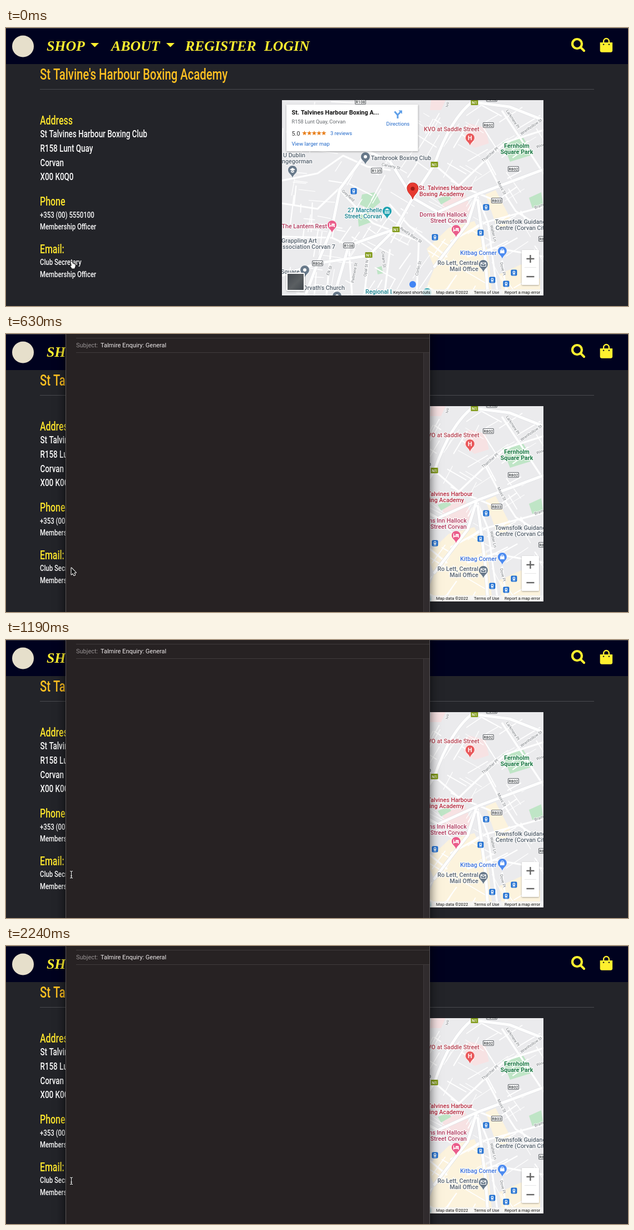
An HTML page with a canvas for the animation above (2.38 s loop, 1118 by 501 pixels).

```html
<!DOCTYPE html>
<html lang="en">
<head>
<meta charset="utf-8">
<title>Contact page</title>
<style>
html, body { margin: 0; width: 100%; height: 100%; overflow: hidden; background: #232429; }
canvas { display: block; }
</style>
</head>
<body>
<canvas id="stage" width="1118" height="501"></canvas>
<script>
const W = 1118, H = 501, LOOP = 2380;
const SANS = 'Roboto, "Liberation Sans", sans-serif';
const SERIF = '"Liberation Serif", "Times New Roman", serif';
const CONDENSED = 0.74;
const view = document.getElementById('stage').getContext('2d');
const page = document.createElement('canvas');
page.width = W;
page.height = H;
let g = page.getContext('2d');

function box(x, y, w, h, color) {
  g.fillStyle = color;
  g.fillRect(x, y, w, h);
}

function round(x, y, w, h, r, color) {
  g.fillStyle = color;
  g.beginPath();
  g.roundRect(x, y, w, h, r);
  g.fill();
}

function disc(x, y, r, color) {
  g.fillStyle = color;
  g.beginPath();
  g.arc(x, y, r, 0, 7);
  g.fill();
}

function shape(d, fill, stroke, width = 1) {
  const p = new Path2D(d);
  if (stroke) {
    g.strokeStyle = stroke;
    g.lineWidth = width;
    g.stroke(p);
  }
  if (fill) {
    g.fillStyle = fill;
    g.fill(p);
  }
}

function text(s, x, y, size, color, { weight = 400, align = 'left', halo = 0, font = SANS } = {}) {
  g.font = `${weight} ${size}px ${font}`;
  g.textAlign = align;
  if (halo) {
    g.strokeStyle = '#ffffffd0';
    g.lineWidth = halo;
    g.strokeText(s, x, y);
  }
  g.fillStyle = color;
  g.fillText(s, x, y);
}

// One narrow face for the whole left column
function narrow(s, x, y, size, color) {
  g.save();
  g.translate(x, y);
  g.scale(CONDENSED, 1);
  text(s, 0, 0, size, color, { weight: 500 });
  g.restore();
}

function rotated(s, x, y, deg) {
  g.save();
  g.translate(x, y);
  g.rotate(deg * Math.PI / 180);
  text(s, 0, 2.5, 7.2, '#74787d', { align: 'center', halo: 2 });
  g.restore();
}

function random(seed) {
  return () => (seed = (seed * 16807) % 2147483647) / 2147483647;
}

function drawNav() {
  const yellow = '#fff02f', navy = '#00021f';
  box(0, 0, W, 65, navy);
  box(0, 0, W, 1, '#3b3c45');
  disc(30.5, 33, 19.5, '#e6dfcb');
  const items = [['SHOP', 73], ['ABOUT', 189], ['REGISTER', 322], ['LOGIN', 464]];
  for (const [s, x] of items) text(s, x, 40.5, 25.8, yellow, { weight: 'italic 700', font: SERIF });
  for (const x of [152, 288]) shape(`M${x} 27h15l-7.5 7.5z`, yellow);
  g.lineCap = 'round';
  shape('M1035 28.5a8.5 8.5 0 1 1-17 0a8.5 8.5 0 1 1 17 0M1033 35L1039 41', null, yellow, 4.2);
  g.lineCap = 'butt';
  round(1067.7, 26, 22.4, 17.7, [0, 0, 3.5, 3.5], yellow);
  shape('M1074.1 27v-3a4.9 4.9 0 0 1 9.8 0v3', null, yellow, 2.5);
  disc(1074.1, 29.6, 1.2, navy);
  disc(1083.9, 29.6, 1.2, navy);
}

function drawContact() {
  const gold = '#ffc122', yellow = '#ffe72d', white = '#fafafa';
  narrow("St Talvine's Harbour Boxing Academy", 61, 93, 27.4, gold);
  box(61, 110, 996, 1, '#4a4b4f');
  const heads = [['Address', 173.5], ['Phone', 320.3], ['Email:', 406.3]];
  for (const [s, y] of heads) narrow(s, 61, y, 21.5, yellow);
  const lines = ['St Talvines Harbour Boxing Club', 'R158 Lunt Quay', 'Corvan', 'X00 K0Q0'];
  lines.forEach((s, i) => narrow(s, 61.5, 197 + i * 25.8, 18.1, white));
  const small = [['+353 (00) 5550100', 341.5], ['Membership Officer', 362.5],
    ['Club Secretary', 426.5], ['Membership Officer', 448.5]];
  for (const [s, y] of small) narrow(s, 61, y, 15.4, white);
}

function drawLand() {
  box(496, 130, 470, 352, '#ebebed');
  const cream = '#fcf3dd', green = '#bfe5c6', pink = '#f7e2e3';
  shape('M756 398L796 360L842 348L866 400L874 482H750L770 432z', cream);
  shape('M862 300L880 292L910 350L884 364z', cream);
  shape('M886 444L926 426L960 452V482H892z', cream);
  shape('M832 172L862 180L868 208L842 216L822 200zM788 310L826 300L838 332L802 350L782 330z', pink);
  shape('M764 130h26l-8 18h-20z', pink);
  shape('M640 300L664 296L673 314L656 328L636 318zM632 338L652 332L656 350L634 358z', green);
  shape('M892 206L930 198L948 228L906 241zM940 306L962 296L966 322L946 324z', green);
  shape('M776 308L796 300L800 308L782 318zM666 432l9-3l3 13l-10 2z', green);
}

function drawStreets() {
  const rnd = random(4127);
  g.lineCap = 'round';
  g.strokeStyle = '#fff';
  for (let i = 0; i < 210; i++) {
    const x = 496 + rnd() * 470, y = 130 + rnd() * 352;
    const lean = x < 600 ? 0.12 : x > 850 ? 1.02 : 0.55;
    const a = lean + (rnd() < 0.5 ? Math.PI / 2 : 0) + (rnd() - 0.5) * 0.16;
    const len = 12 + rnd() * 42;
    g.lineWidth = 1 + rnd() * 1.2;
    g.beginPath();
    g.moveTo(x, y);
    g.lineTo(x + Math.cos(a) * len, y + Math.sin(a) * len);
    g.stroke();
  }
  const side = 'M496 275L560 262L606 230L650 250L690 256M496 316L560 326L598 290L632 326L660 352L742 384' +
    'M690 318L724 356L792 412M770 246L814 284L880 311M814 284L862 238L898 206L966 184' +
    'M862 238L884 280L916 330L966 362M846 300L866 350L884 482M800 384L862 350L966 322' +
    'M690 400L680 482M652 410L644 482M616 392L622 482M584 400L576 482M742 384L738 482' +
    'M496 376L586 378L616 392M830 412L878 396L966 412M892 420L900 482M892 150L924 198L966 262';
  shape(side, null, '#fff', 3.2);
  const main = 'M842 130Q800 160 770 246L731 306L700 362L652 410L560 424L496 446' +
    'M637 130L650 222L690 240L731 306L776 332L846 300L966 255' +
    'M842 134L905 142L966 166M700 362L616 392L590 482M770 430L830 352L846 300' +
    'M650 222L600 290L586 360L560 424L538 482M848 310L862 420L866 482';
  shape(main, null, '#d9dbdf', 6.2);
  shape(main, null, '#fff', 5.2);
  g.lineCap = 'butt';
}

function drawStreetNames() {
  const names = [['Carveny St', 692, 249, 12], ['Larkmere Pl', 911, 164, 57], ['Wrenhollow St', 944, 178, -35],
    ['Thatcher Pl', 870, 228, -41], ['Moss St', 891, 288, 62], ['Walter Ln', 876, 370, 76],
    ['Dove Pl', 893, 434, 76], ["Reed's Barn St", 728, 373, 34], ['Greyfield', 615, 302, 42],
    ['Elk St', 581, 437, -70], ['Pellmere St', 626, 441, -80], ['Opal St N', 647, 433, -82],
    ['Cream St', 679, 417, 84], ['Corlin St', 741, 433, -76], ['Ivo', 793, 138, -80],
    ['Bram', 958, 321, -20], ['Wind', 961, 212, -18]];
  for (const n of names) rotated(...n);
}

function drawSigns() {
  const signs = [['R108', 637, 133], ['R802', 867, 175], ['R802', 912, 254], ['R135', 666, 257],
    ['R803', 882, 311], ['R108', 616, 392], ['R804', 560, 424], ['R802', 967, 380], ['R802', 873, 128]];
  for (const [s, x, y] of signs) {
    round(x - 10, y - 5, 20, 10, 2, '#62666b');
    round(x - 9, y - 4, 18, 8, 1.5, '#fff');
    text(s, x, y + 2.7, 7.3, '#3c4043', { align: 'center', weight: 500 });
  }
  for (const [x, y] of [[842, 134], [770, 246], [701, 363], [652, 409]]) {
    round(x - 6.5, y - 5, 13, 10, 1, '#829b1b');
    text('N1', x, y + 2.8, 7.5, '#fff', { align: 'center', weight: 500 });
  }
  const stops = [[625, 294], [863, 323], [853, 369], [771, 377], [913, 441], [874, 454], [899, 461]];
  for (const [x, y] of stops) {
    round(x - 5.5, y - 5.5, 11, 11, 2, '#2170d2');
    round(x - 2.3, y - 3.3, 4.6, 5.6, 1, '#fff');
    box(x - 1.3, y - 1.8, 2.6, 1.8, '#2170d2');
    box(x - 2.5, y + 3, 5, 0.8, '#fff');
  }
}

// Pin symbols, drawn around the centre of the pin head
const marks = {
  bed: () => shape('M-5-3.5h1.3v4h8.7v3.5h-1.3v-1.5h-7.4v1.5h-1.3zM-.8-2.5h4.3q1.5 0 1.5 1.5v1h-5.8z', '#fff'),
  cap: () => shape('M-5-1l5-3l5 3l-5 3zM-3 1.5l3 1.5l3-1.5v2l-3 1.5l-3-1.5z', '#fff'),
  hall: () => shape('M-4.5-2l4.5-3l4.5 3zM-4-1h1.5v4h-1.5zM-.8-1h1.6v4h-1.6zM2.5-1h1.5v4h-1.5zM-4.5 3.3h9v1.2h-9z', '#fff'),
  mail: () => shape('M-4.5-3h9v6.5h-9zl4.5 3.6l4.5-3.6', null, '#fff', 1.2),
  bag: () => {
    box(-3.8, -1.5, 7.6, 5.5, '#fff');
    shape('M-2-1v-1a2 2 0 0 1 4 0v1', null, '#fff', 1.1);
  },
  dot: () => disc(0, 0, 3, '#fff'),
  H: () => text('H', 0, 4, 11, '#fff', { weight: 700, align: 'center' }),
};

function pin(x, y, color, mark) {
  g.save();
  g.translate(x, y);
  shape('M0 14C-1 8-8 6-8 0a8 8 0 0 1 16 0C8 6 1 8 0 14z', color, '#ffffffb0', 1.5);
  if (mark) marks[mark]();
  g.restore();
}

function drawPlaces() {
  const gray = '#68798a', slate = '#56626e', rose = '#b03a5e', red = '#b3283d';
  const teal = '#16818e', blue = '#3c72dc', green = '#1d7a45';
  const left = [['Tarnbrook Boxing Club', 656, 237.5, slate], ['KVO at Saddle Street', 751, 186, '#b54150'],
    ['St. Talvines Harbour', 742, 292, red], ['Boxing Academy', 743, 303, red],
    ['Townsfolk Guidance', 879, 353, slate], ['Centre (Corvan City)', 880, 364, slate],
    ['Grappling Art', 495, 387, slate], ['ssociation Corvan 7', 497, 398, slate],
    ["Orvath's Church", 534, 472, slate], ['Regional L', 646, 479, teal], ['Square', 494, 443, slate],
    ['U Dublin', 498, 233, slate], ['ngegorman', 496, 243.5, slate]];
  const right = [['27 Marchelle', 676, 332, teal], ['Street, Corvan', 676, 342.5, teal],
    ['The Lantern Rest', 577, 361, rose], ['Dorns Inn Hallock', 828, 339.5, rose],
    ['Street Corvan', 828, 350.5, rose], ['Kitbag Corner', 882, 408.5, blue],
    ['Ro Lett, Central', 849, 426.5, slate], ['Mail Office', 849, 437.5, slate]];
  const label = (s, x, y, c, align, weight = 500) => text(s, x, y, 10.7, c, { halo: 2.5, align, weight });
  for (const [s, x, y, c] of left) label(s, x, y, c, 'left');
  for (const [s, x, y, c] of right) label(s, x, y, c, 'right');
  label('Fernholm', 918, 216, green, 'center', 700);
  label('Square Park', 918, 227, green, 'center', 700);
  pin(646, 232, gray, 'dot');
  pin(515, 256, gray, 'cap');
  pin(537, 436, gray, 'dot');
  pin(595, 483, gray, 'dot');
  pin(757, 477, '#24a0ad');
  pin(834, 198, '#e9585a', 'H');
  pin(685, 330, '#1fa1b0', 'hall');
  pin(586, 355, '#ea5c8a', 'bed');
  pin(809, 363, '#ea5c8a', 'bed');
  pin(892, 402, '#4d8bf0', 'bag');
  pin(858, 426, gray, 'mail');
  shape('M731 308C729 300 721 297 721 289a10 10 0 0 1 20 0C741 297 733 300 731 308z', '#e63a30', '#b42620', 1.2);
  disc(731, 289.5, 3.6, '#9d1c17');
}

function star(x, y) {
  g.fillStyle = '#e8811f';
  g.beginPath();
  for (let i = 0; i < 10; i++) {
    const r = i % 2 ? 2 : 4.6, a = i * Math.PI / 5;
    g.lineTo(x + r * Math.sin(a), y - r * Math.cos(a));
  }
  g.fill();
}

function drawMapPanels() {
  const link = '#2068c9';
  g.save();
  g.shadowColor = '#0005';
  g.shadowBlur = 3;
  g.shadowOffsetY = 1;
  box(504, 138, 236.5, 84, '#fff');
  round(927, 400, 31, 63, 1, '#fff');
  round(504, 441, 33, 33, 2, '#fff');
  g.restore();
  text('St. Talvines Harbour Boxing A...', 513.5, 156, 11, '#111', { weight: 600 });
  text('R158 Lunt Quay, Corvan', 513.5, 171.5, 9.2, '#63676b');
  text('5.0', 513.5, 193.5, 10.8, '#333');
  for (let i = 0; i < 5; i++) star(536.5 + i * 8.7, 189.5);
  text('3 reviews', 583, 193, 9.3, link);
  text('View larger map', 513.5, 212, 9.5, link);
  text('Directions', 704.5, 175.5, 9.3, link, { align: 'center' });
  shape('M704 163V156.5L709 151.5M704 157L698.5 150.5', null, '#5f9fe8', 3);
  shape('M705.5 148.5h6.5v6.5z', '#5f9fe8');

  box(932, 431, 21, 1, '#e6e6e6');
  box(935.5, 414.7, 14, 2.4, '#666');
  box(941.3, 409, 2.4, 14, '#666');
  box(935.5, 446.9, 14, 2.4, '#666');
  const photo = g.createLinearGradient(506, 443, 535, 472);
  photo.addColorStop(0, '#43484e');
  photo.addColorStop(0.55, '#5b5f62');
  photo.addColorStop(1, '#41474d');
  box(506, 443, 29, 29, photo);
  disc(731, 462, 6, '#4285f4');
  box(693, 471, 273, 11, '#f5f5f5d0');
  const notes = [['Keyboard shortcuts', 696], ['Map data ©2022', 773], ['Terms of Use', 841], ['Report a map error', 896]];
  for (const [s, x] of notes) text(s, x, 479.3, 7.7, '#111');
}

function drawMap() {
  g.save();
  g.beginPath();
  g.rect(496, 130, 470, 352);
  g.clip();
  drawLand();
  drawStreets();
  drawStreetNames();
  drawSigns();
  drawPlaces();
  drawMapPanels();
  g.restore();
}

function drawMail(caret) {
  g.save();
  g.shadowColor = '#000a';
  g.shadowBlur = 18;
  box(107, -20, 655, H + 40, '#272223');
  g.restore();
  box(107, 0, 1, H, '#595456');
  box(761, 0, 1, H, '#595456');
  box(126, 7, 635, 1, '#403b3c');
  box(126, 33, 635, 1, '#403b3c');
  box(750, 34, 11, H, '#302b2d');
  box(750, 34, 1, H, '#3e393b');
  text('Subject:', 126, 23.8, 11, '#979293');
  text('Talmire Enquiry: General', 170, 23.8, 11, '#eeeaeb');
  if (caret) box(126, 45.5, 1, 10.5, '#e8e4e5');
}

const hand = 'M117 421c1.4-.8 2.1 0 2.3 1.2l.5 2.4c1-.4 1.6 0 1.8.7c.9-.3 1.5 0 1.7.7' +
  'c1-.2 1.4.4 1.4 1.4c0 2.5-.6 3.6-1.4 5v1h-4.9c-.7-2.1-2.1-3-2.7-4.7c.4-.9 1.4-.6 2.2.3l-1.3-6.1z';
const arrow = 'M117.5 421.5v12l2.8-2.6l1.9 4.1l2-.9l-1.9-4h3.6z';

function drawCursor(t) {
  if (t < 280) {
    shape(hand, '#fff', '#111', 1.6);
  } else if (t < 770) {
    shape(arrow, '#111', '#fff', 2);
  } else {
    const y = t < 2100 ? 416.5 : 417;
    const beam = `M115 ${y}q2.5 0 2.5 1.5q0-1.5 2.5-1.5M117.5 ${y + 1}v10.5` +
      `M115 ${y + 12.5}q2.5 0 2.5-1.5q0 1.5 2.5 1.5M116 ${y + 8.5}h3`;
    shape(beam, null, '#111', 2.6);
    shape(beam, null, '#f2f2f2', 1.1);
  }
}

function drawPage() {
  g.lineJoin = 'round';
  box(0, 0, W, H, '#232429');
  drawNav();
  drawContact();
  drawMap();
}

drawPage();
g = view;
g.lineJoin = 'round';
const start = performance.now();

function tick() {
  const t = (performance.now() - start) % LOOP;
  const caret = (t >= 700 && t < 1190) || (t >= 1750 && t < 2240);
  g.drawImage(page, 0, 0);
  if (t >= 630) drawMail(caret);
  drawCursor(t);
  requestAnimationFrame(tick);
}
tick();
</script>
</body>
</html>
```
